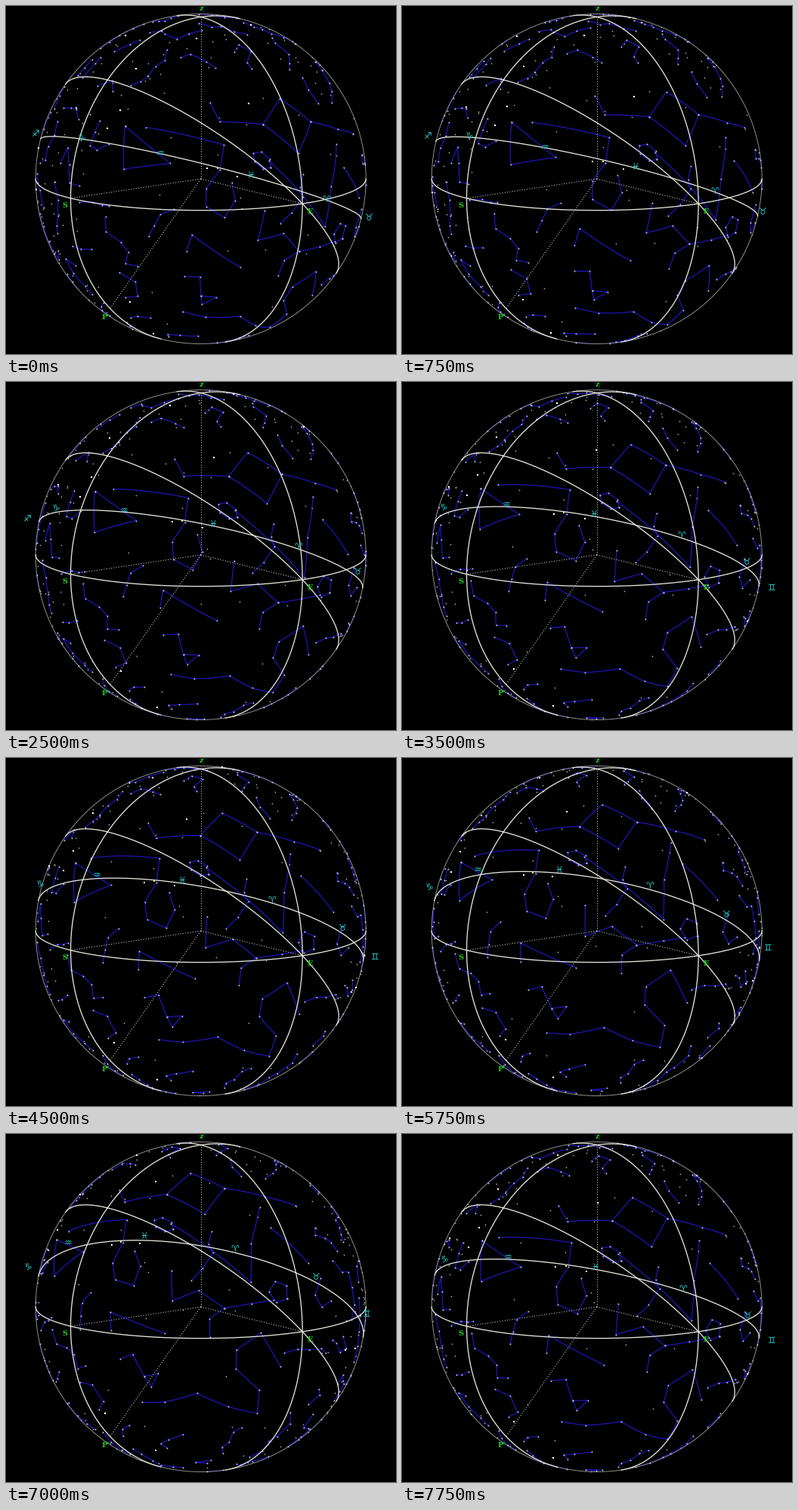
Animation, 516 px wide and 461 px high, one loop 8 s. Source, as a matplotlib script:

```python
import numpy as np
import matplotlib.pyplot as plt
from matplotlib.animation import FuncAnimation

W, H, DPI = 516, 461, 100
CX, CY, R = 257.7, 229.0, 218.5
FRAMES, STEP = 32, 1.5            # degrees of sky rotation per frame
OBLIQUITY = np.radians(23.44)
PRECESSION = np.radians(-5.8)
WHITE, GREEN, CYAN = "#e6e6de", "#22c822", "#20d0d0"
rng = np.random.default_rng(7)

# Observer's axes seen on screen: x right, y up, z toward the viewer
tilt, turn, lat = np.radians([11.0, 38.0, 45.8])
X = np.array([1.0, 0, 0])
ZENITH = np.array([0, np.cos(tilt), np.sin(tilt)])
FRONT = np.array([0, -np.sin(tilt), np.cos(tilt)])
SOUTH = -np.cos(turn) * X + np.sin(turn) * FRONT
EAST = np.sin(turn) * X + np.cos(turn) * FRONT
POLE = np.sin(lat) * ZENITH - np.cos(lat) * SOUTH
CULM = np.cos(lat) * ZENITH + np.sin(lat) * SOUTH


def unit(v):
    return v / np.linalg.norm(v, axis=-1, keepdims=True)


def sphere(lon, lat_):
    lon, lat_ = np.radians(lon), np.radians(lat_)
    return np.stack([np.cos(lat_) * np.cos(lon), np.cos(lat_) * np.sin(lon),
                     np.sin(lat_) + 0 * lon], axis=-1)


def rot_x(a):
    c, s = np.cos(a), np.sin(a)
    return np.array([[1, 0, 0], [0, c, s], [0, -s, c]])


def rot_z(a):
    c, s = np.cos(a), np.sin(a)
    return np.array([[c, s, 0], [-s, c, 0], [0, 0, 1]])


ECL_TO_EQU = rot_x(OBLIQUITY)
EPOCH = rot_x(-OBLIQUITY) @ rot_z(PRECESSION) @ ECL_TO_EQU


def ecliptic(lon, lat_=0.0):
    return sphere(np.asarray(lon, float), lat_) @ ECL_TO_EQU


def sky_matrix(theta):
    t = np.radians(theta)
    aries = np.cos(t) * CULM - np.sin(t) * EAST
    ninety = np.sin(t) * CULM + np.cos(t) * EAST
    return np.array([aries, ninety, POLE])


def project(v, front_only=True):
    x, y = CX + R * v[..., 0], CY - R * v[..., 1]
    if front_only:
        hidden = ~(v[..., 2] > 0)
        x, y = np.where(hidden, np.nan, x), np.where(hidden, np.nan, y)
    return x, y


segments, stars = [], []


def join(v):
    """Link the stars in v with arcs of the sphere."""
    stars.extend(v)
    for a, b in zip(v[:-1], v[1:]):
        segments.append(unit(a + np.linspace(0, 1, 8)[:, None] * (b - a)))
        segments.append(np.full((1, 3), np.nan))


def path(*points):
    join(sphere(*np.array(points, float).T) @ EPOCH)


def ring(ra, dec, width, height, count):
    t = np.linspace(0, 2 * np.pi, count + 1)
    join(sphere(ra + width * np.cos(t), dec + height * np.sin(t)) @ EPOCH)


# The large figures that cross the middle of the globe
path((2, 29), (346, 28), (346, 15), (3, 15), (2, 29), (17, 36), (31, 42))    # Pegasus
path((346, 15), (333, 6), (326, 10))
path((304.5, -12.5), (312, -26), (327, -16), (304.5, -12.5))                 # Capricornus
path((312, -9.5), (339, 0), (343, -8), (343, -16), (347, -21),               # Aquarius
     (355, -20), (354, -13), (349, -9))
ring(353, 4, 4, 2.5, 6)                                                      # Pisces
path((355, 5.5), (30.5, 3), (23, 15), (18, 30))
path((26, 25), (46, 23))                                                     # Aries
path((5, -9), (11, -18), (17, -10), (28, -10), (35, -3), (41, 3))            # Cetus
path((30, -21), (26, -16), (28, -10))
ring(41, 6.5, 4, 3.8, 5)
path((59, -13), (44, -9), (41, -19), (46, -24), (60, -24), (69, -30),        # Eridanus
     (57, -36), (42, -40), (34, -51), (24, -57))
path((15, -29), (350, -32), (353, -38))                                      # Sculptor
path((2, -46), (7, -42), (17, -47), (22, -43), (23, -49), (17, -47))         # Phoenix


def fill_sky(count, clearance):
    """Wandering star chains on an even spiral, clear of the large figures."""
    k = np.arange(count) + 0.5
    centres = sphere(k * 137.508, np.degrees(np.arcsin(1 - 2 * k / count)))
    taken = np.array(stars)
    for c in centres:
        if (taken @ c).max() > np.cos(np.radians(clearance)):
            continue
        side = unit(np.cross(c, rng.normal(size=3)))
        up = np.cross(c, side)
        n = rng.integers(3, 7)
        heading = rng.uniform(0, 2 * np.pi) + np.cumsum(rng.normal(0, 0.9, n))
        stride = np.radians(rng.uniform(3, 7, n))
        walk = np.cumsum(stride * np.array([np.cos(heading), np.sin(heading)]), axis=1)
        u, v = walk - walk.mean(axis=1, keepdims=True)
        join(unit(c + u[:, None] * side + v[:, None] * up))


fill_sky(130, 10)
segments, stars = np.concatenate(segments), np.array(stars)

# Loose stars, thicker along the Milky Way
even = unit(rng.normal(size=(90, 3)))
band = sphere(rng.uniform(0, 360, 170), rng.normal(0, 14, 170))
gal_pole = sphere(192.9, 27.1)
gal_x = unit(np.cross(gal_pole, [0, 0, 1]))
band = band @ np.array([gal_x, np.cross(gal_pole, gal_x), gal_pole])
field = np.concatenate([even, band])
bright = np.concatenate([field[::12], ecliptic([-29, -18], -1.3)])
sun = ecliptic([-25.5], -0.4)
ecl_line = ecliptic(np.linspace(0, 360, 721))
signs = ecliptic(15 + 30 * np.arange(12))

fig = plt.figure(figsize=(W / DPI, H / DPI), dpi=DPI, facecolor="black")
ax = fig.add_axes([0, 0, 1, 1])
ax.set(xlim=(0, W), ylim=(H, 0))
ax.axis("off")


def px(n):
    return n * 72 / DPI


def curve(x, y, color, width, z, **style):
    return ax.plot(x, y, color=color, lw=px(width), zorder=z, **style)[0]


def dots(color, size, z):
    return ax.plot([], [], "s", color=color, ms=px(size), mew=0, zorder=z)[0]


def label(x, y, text, color, size, family):
    return ax.text(x, y, text, color=color, size=px(size), family=family, weight="bold",
                   ha="center", va="center_baseline", zorder=6)


around = np.linspace(0, 2 * np.pi, 721)[:, None]
curve(CX + R * np.cos(around), CY + R * np.sin(around), "#8c8c88", 1, 3)
for a, b in [(X, FRONT), (ZENITH, SOUTH), (ZENITH, EAST), (CULM, EAST)]:
    curve(*project(np.cos(around) * a + np.sin(around) * b), WHITE, 1.3, 4)

for tip, name, x, y in [(ZENITH, "z", 258, 3), (SOUTH, "S", 78, 263),
                        (EAST, "E", 402, 271), (-POLE, "P'", 132, 411)]:
    curve([CX, CX + R * tip[0]], [CY, CY - R * tip[1]], "#c8c8c8", 1.1, 3, ls=(0, (1, 2)))
    label(x, y, name, GREEN, 10, "DejaVu Serif")

lines = curve([], [], "#2014b0", 1.3, 2)
ecl = curve([], [], WHITE, 1.3, 4)
layers = [(dots("#b0b0b0", 1.5, 3), field), (dots("#d0d0e8", 1.7, 3), stars),
          (dots("white", 2.4, 5), bright), (dots("#e8e850", 2.6, 5), sun),
          (lines, segments), (ecl, ecl_line)]
marks = [label(0, 0, chr(0x2648 + k), CYAN, 12, "DejaVu Sans") for k in range(12)]


def update(i):
    phase = i if i < 30 else i - 17.5    # the sky jumps back near the end
    m = sky_matrix(-80 + STEP * phase)
    for artist, v in layers:
        artist.set_data(*project(v @ m))
    for mark, v in zip(marks, signs @ m):
        mark.set_position(project(1.08 * v, front_only=False))
        mark.set_visible(bool(v[2] > 0))
    return [artist for artist, _ in layers] + marks


anim = FuncAnimation(fig, update, frames=FRAMES, interval=1000 // 4, repeat=True,
                     init_func=lambda: update(0), repeat_delay=0, blit=False)
plt.show()
```
